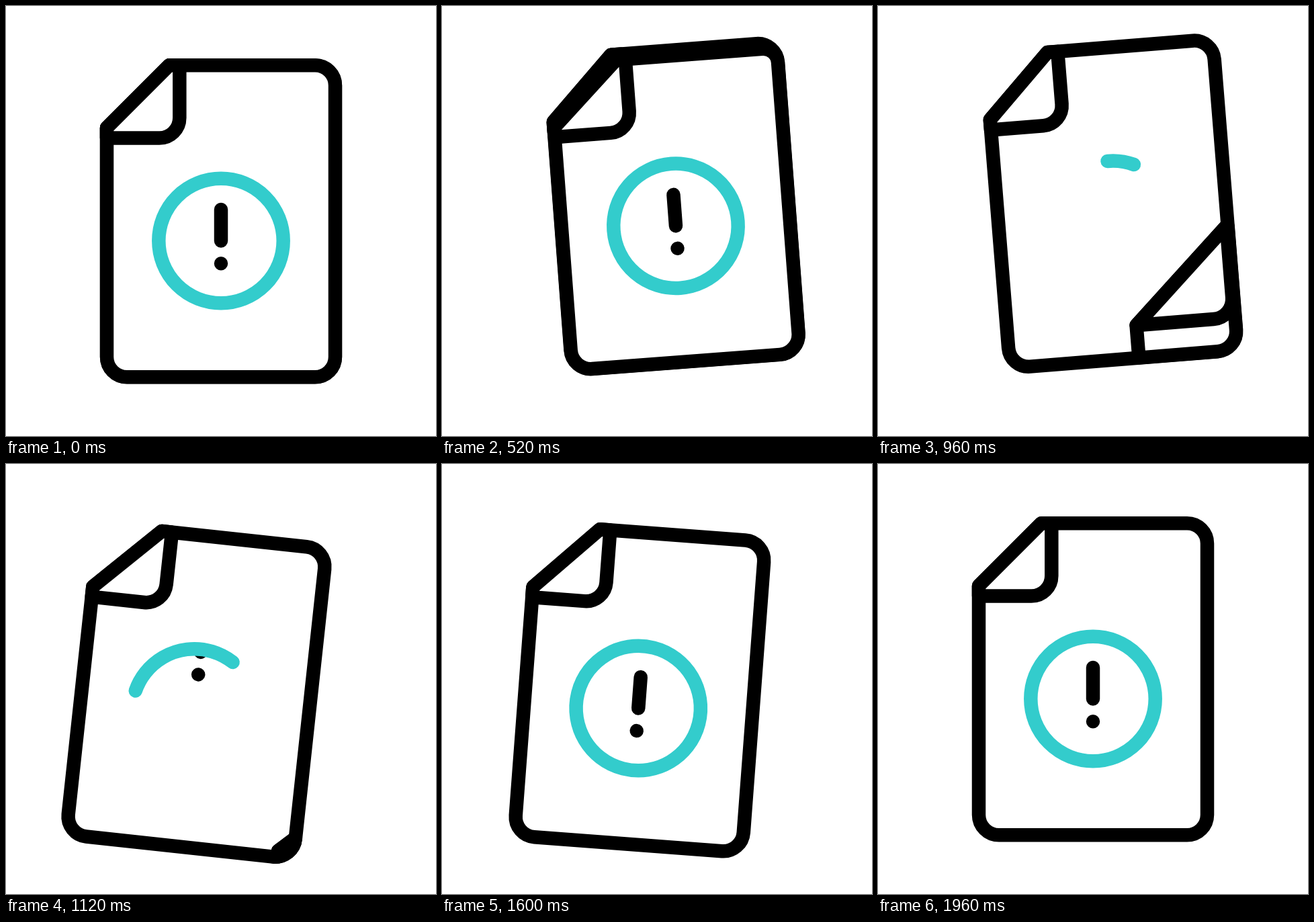
Write an HTML page with a canvas that moves like this. It is 640x640 px and loops after 2400 ms.

```html
<!DOCTYPE html>
<html lang="en">
<head>
<meta charset="utf-8">
<title>Document alert</title>
<style>
  html, body { margin: 0; width: 100%; height: 100%; overflow: hidden; background: #fff; }
  canvas { display: block; }
</style>
</head>
<body>
<canvas id="stage" width="640" height="640"></canvas>
<script>
const ctx = document.getElementById('stage').getContext('2d');
const LOOP = 2400, STEP = 40, WEIGHT = 20.5;
const LEFT = 150, TOP = 88.3, RIGHT = 490, BOTTOM = 552.3, CORNER = 93;
const CX = 320, CY = 349.5, RADIUS = 92.7;
const INK = '#000', TEAL = '#33cccc';

// Page pose: [time, x shift, y shift, degrees]
const poses = [[280, 0, 0, 0], [780, 46.5, -37, -7.2], [1316, -51.5, 26, 8], [1960, 0, 0, 0]];

const ramp = (t, from, to) => Math.min(1, Math.max(0, (t - from) / (to - from)));
const smooth = u => u * u * (3 - 2 * u);
const radians = deg => deg * Math.PI / 180;

// Cubic bezier easing (.67, 0, .2, 1), solved by bisection
function swing(u) {
  let lo = 0, hi = 1;
  for (let i = 0; i < 24; i++) {
    const s = (lo + hi) / 2, r = 1 - s;
    if (3 * s * r * r * .67 + 3 * s * s * r * .2 + s * s * s < u) lo = s; else hi = s;
  }
  return smooth(lo);
}

function poseAt(t) {
  let i = 0;
  while (i < poses.length - 2 && t >= poses[i + 1][0]) i++;
  const a = poses[i], b = poses[i + 1], k = swing(ramp(t, a[0], b[0]));
  return [1, 2, 3].map(n => a[n] + (b[n] - a[n]) * k);
}

function ring(head, share) {
  if (share <= 0) return;
  ctx.strokeStyle = TEAL;
  ctx.beginPath();
  ctx.arc(CX, CY, RADIUS, radians(head), radians(head - 360 * share), true);
  if (share >= 1) ctx.closePath();
  ctx.stroke();
  ctx.strokeStyle = INK;
}

function exclamation(shift) {
  ctx.save();
  ctx.beginPath();
  ctx.arc(CX, CY, RADIUS, 0, 7);
  ctx.clip();
  ctx.beginPath();
  ctx.moveTo(CX, 303 + shift);
  ctx.lineTo(CX, 349.5 + shift);
  ctx.moveTo(CX, 383.2 + shift);
  ctx.lineTo(CX, 383.2 + shift);
  ctx.stroke();
  ctx.restore();
}

// Sheet with its top left corner folded over: peel moves its edges, reach the fold's upper end
function sheet(peel, reach, drawSign) {
  const left = LEFT + (RIGHT - LEFT) * peel ** 2;
  const top = TOP + (BOTTOM - TOP) * (.75 * peel - .5 * peel ** 2 + .75 * peel ** 3);
  const foldX = LEFT + CORNER + (RIGHT - LEFT - CORNER) * reach;
  const size = foldX - left;
  const foldY = top + size - Math.min(top - TOP, size * .06);
  const gap = 15.3 * (1 - peel) ** 4;

  ctx.beginPath();
  ctx.moveTo(foldX, top);
  ctx.arcTo(RIGHT, top, RIGHT, BOTTOM, Math.max(0, 30 - (top - TOP)));
  ctx.arcTo(RIGHT, BOTTOM, left, BOTTOM, 30);
  ctx.arcTo(left, BOTTOM, left, foldY, Math.max(0, 30 - (left - LEFT)));
  ctx.lineTo(left, foldY);
  ctx.closePath();
  ctx.fill();
  ctx.stroke();
  ctx.save();
  ctx.clip();
  drawSign();
  ctx.restore();

  ctx.beginPath();
  ctx.moveTo(left, foldY);
  ctx.lineTo(foldX, top);
  ctx.lineTo(foldX + gap, top);
  ctx.arcTo(foldX + gap, foldY + gap, left, foldY + gap, Math.min(30, size / 2));
  ctx.lineTo(left, foldY + gap);
  ctx.closePath();
  ctx.fill();
  ctx.stroke();
}

function draw(t) {
  const [dx, dy, angle] = poseAt(t);
  const peel = smooth(ramp(t, 450, 1205));
  const reach = smooth(ramp(t, 468, 988));
  const drawn = smooth(ramp(t, 835, 1615));

  ctx.fillStyle = '#fff';
  ctx.fillRect(0, 0, 640, 640);
  ctx.save();
  ctx.translate(CX + dx, CY + dy);
  ctx.rotate(radians(angle));
  ctx.translate(-CX, -CY);
  ctx.lineWidth = WEIGHT;
  ctx.lineCap = ctx.lineJoin = 'round';
  ctx.strokeStyle = INK;

  sheet(0, 0, () => {
    exclamation(-140 * (1 - smooth(ramp(t, 876, 1470))));
    ring(-68 + 33 * drawn, drawn);
  });
  if (peel < 1) {
    const half = WEIGHT / 2;
    ctx.beginPath();
    ctx.roundRect(LEFT - half, TOP - half, RIGHT - LEFT + WEIGHT, BOTTOM - TOP + WEIGHT, 30 + half);
    ctx.clip();
    sheet(peel, reach, () => {
      exclamation(140 * smooth(ramp(t, 520, 880)));
      ring(0, 1);
    });
  }
  ctx.restore();
}

const start = performance.now();
function tick() {
  const t = (performance.now() - start) % LOOP;
  draw(Math.floor(t / STEP) * STEP);
  requestAnimationFrame(tick);
}
tick();
</script>
</body>
</html>
```
